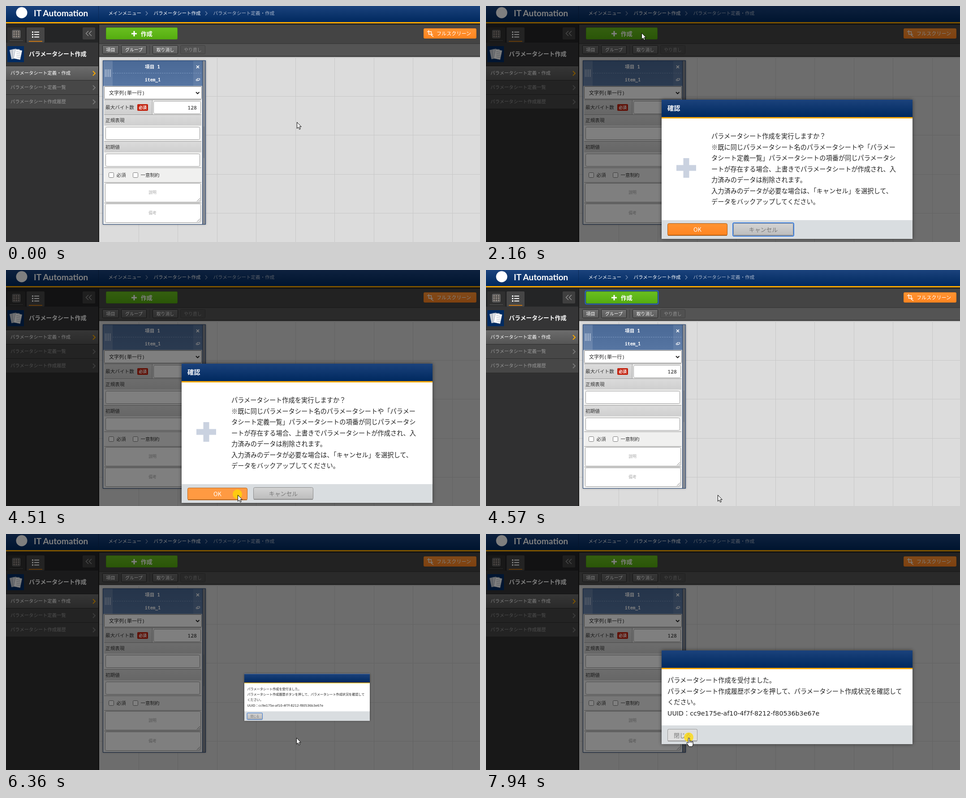
These frames come from a looping animation (1058 px wide and 529 px high, 8000 ms). An HTML page:

```html
<!DOCTYPE html>
<html lang="ja">
<head>
<meta charset="utf-8">
<style>
html, body { margin: 0; width: 100%; height: 100%; overflow: hidden; background: #dcdcdc; }
svg { display: block; width: 100vw; height: 100vh; }
text { font-family: "Noto Sans CJK JP", "Noto Sans CJK", sans-serif; white-space: pre; }
.b { font-weight: 700; }
.m { text-anchor: middle; }
.mono { font-family: "Noto Sans Mono", "Noto Sans CJK JP", monospace; }
.wide { font-family: "DejaVu Sans", "Noto Sans CJK JP", sans-serif; }
</style>
</head>
<body>
<svg id="stage" viewBox="0 0 1058 529" preserveAspectRatio="none"></svg>
<script>
const rect = (x, y, w, h, fill, more = '') =>
  `<rect x="${x}" y="${y}" width="${w}" height="${h}" fill="${fill}" ${more}/>`;
// 1px bordered box, snapped to pixel centres
const box = (x, y, w, h, fill, stroke, r = 2, more = '') =>
  rect(x + .5, y + .5, w - 1, h - 1, fill, `stroke="${stroke}" rx="${r}" ${more}`);
const line = (d, stroke, w = 1, more = '') =>
  `<path d="${d}" fill="none" stroke="${stroke}" stroke-width="${w}" ${more}/>`;
// y is the vertical middle of the glyphs
const text = (x, y, size, str, fill, cls = '') =>
  `<text x="${x}" y="${y + size * .38}" font-size="${size}" fill="${fill}" class="${cls}">${str}</text>`;
const grad = (id, a, b) =>
  `<linearGradient id="${id}" x2="0" y2="1"><stop stop-color="${a}"/><stop offset="1" stop-color="${b}"/></linearGradient>`;
const shadow = (id, size, opacity) =>
  `<filter id="${id}" x="-10%" y="-10%" width="120%" height="120%">` +
  `<feDropShadow dx="0" dy="0" stdDeviation="${size}" flood-opacity="${opacity}"/></filter>`;
const group = (id, body) => `<g id="${id}">${body}</g>`;
const ring = (id, x, y, w, h) =>
  group(id, rect(x - 1, y - 1, w + 2, h + 2, 'none', 'stroke="#1a6be0" stroke-width="1.6" rx="3"'));
const range = (n, f) => Array.from({ length: n }, (_, i) => f(i)).join('');

const defs = '<defs>' + grad('navy', '#1b427c', '#00295f') + grad('green', '#69bf20', '#55ad10') +
  grad('greenHi', '#7bc93c', '#65b924') + grad('orange', '#ff9433', '#ff8420') +
  grad('blue', '#4a6996', '#5675a2') + grad('label', '#dbdbdb', '#cfcfcf') +
  grad('grey', '#d4d4d4', '#bcbcbc') + grad('active', '#6c6c6c', '#555') +
  grad('tool', '#707070', '#5c5c5c') + grad('shade', '#888', '#dcdcdc') +
  shadow('soft', 4, .5) + shadow('faint', 2, .3) + '</defs>';

const header = rect(0, 0, 1058, 36, 'url(#navy)') + rect(206, 0, 1, 36, '#0a2a58') +
  rect(0, 36, 1058, 3, '#f9a800') + rect(0, 39, 1058, 3, '#262626') +
  '<circle cx="35" cy="15" r="12.5" fill="#fff"/>' +
  '<text x="62" y="22.5" font-size="19" fill="#fff" class="b" style="font-family:Lato,sans-serif">IT Automation</text>' +
  text(228.5, 16, 10.55, 'メインメニュー', '#fff') +
  text(329.5, 16, 10.55, 'パラメータシート作成', '#fff') +
  text(462.5, 16, 10.55, 'パラメータシート定義・作成', '#a9b6cb') +
  line('M312 12l4 4.5l-4 4.5M445 12l4 4.5l-4 4.5', '#6d85ab', 1.5);

const menuItem = (y, label, on) =>
  rect(0, y, 206, 31, on ? 'url(#active)' : '#474747') + rect(0, y + 31, 206, 1, '#2c2c2c') +
  text(10, y + 15.5, 10.35, label, on ? '#fff' : '#999') +
  line(`M194 ${y + 11}l5 5l-5 5`, on ? '#f9a800' : '#777', 2);

const sidebar = rect(0, 42, 206, 487, '#303031') + rect(0, 42, 206, 40, '#242526') +
  rect(3, 48, 40, 34, '#303030', 'rx="2"') + rect(46, 48, 40, 34, '#464646', 'rx="2"') +
  rect(8, 77, 30, 1, '#555') + rect(51, 78.5, 30, 1.5, '#f08300') +
  box(14, 54, 18, 18, 'none', '#999', 1) +
  range(9, i => rect(16 + i % 3 * 5, 56 + (i / 3 | 0) * 5, 4, 4, '#8d8680')) +
  range(3, i => rect(58, 57 + i * 5.5, 3, 3, '#fff') + rect(63, 57.5 + i * 5.5, 11, 2, '#fff')) +
  rect(171, 48, 28, 27, '#3f3f3f', 'rx="2"') +
  line('M184 56l-5.5 5.5l5.5 5.5M191 56l-5.5 5.5l5.5 5.5', '#999', 1.3) +
  rect(0, 82, 206, 52, '#353536') + rect(3, 90, 37, 36, '#002b62') +
  rect(10, 97, 15, 21, '#c9ced6', 'transform="rotate(-12 17 108)"') +
  rect(15, 97, 15, 21, '#e3e6ea', 'stroke="#8d98aa" stroke-width=".7"') +
  rect(19, 98, 15, 21, '#fff', 'transform="rotate(12 26 108)" stroke="#8d98aa" stroke-width=".7"') +
  range(4, i => line(`M23 ${102 + i * 4}l9 1.8`, '#aab2be', 1)) +
  text(51, 107, 12.9, 'パラメータシート作成', '#fff', 'b') + rect(0, 134, 206, 1, '#222') +
  menuItem(135, 'パラメータシート定義・作成', true) +
  menuItem(167, 'パラメータシート定義一覧') + menuItem(199, 'パラメータシート作成履歴') +
  rect(206, 42, 2, 487, '#1b1b1b');

const toolButton = (x, w, label, size, off) =>
  box(x, 88, w, 20, off ? '#515151' : 'url(#tool)', off ? '#404040' : '#242424') +
  text(x + w / 2, 98, size, label, off ? '#949494' : '#fff', 'm');

const toolbar = rect(208, 42, 850, 42, '#444') + rect(208, 84, 850, 1, '#333') +
  rect(208, 85, 850, 27, '#545454') + rect(208, 112, 850, 2, '#3a3a3a') +
  box(223, 48, 160, 27, 'url(#green)', '#4d9a12') +
  group('createHi', box(223, 48, 160, 27, 'url(#greenHi)', '#5fae25')) +
  ring('createRing', 222.5, 47.5, 161, 28) +
  line('M280 62h12M286 56v12', '#fff', 3) + text(301, 62, 12.9, '作成', '#fff', 'b') +
  box(932, 50, 118, 23, 'url(#orange)', '#f5801c') +
  line('M940 57.5h9.5v9.5M943.5 54v9.5h9.5M949 65l5 4', '#fff', 1.3) +
  text(961, 62, 11.1, 'フルスクリーン', '#fff') +
  toolButton(215, 37, '項目', 10.3) + toolButton(257, 57, 'グループ', 9.9) +
  rect(320, 88, 1, 20, '#404040') +
  toolButton(327, 57, '取り消し', 9.9) + toolButton(389, 56, 'やり直し', 9.9, true);

const grid = rect(208, 114, 850, 415, '#dcdcdc') + rect(208, 114, 850, 3, 'url(#shade)', 'opacity=".5"') +
  range(9, i => rect(Math.floor(296.2 + i * 87.5), 114, 1, 415, '#c8c8c8')) +
  range(4, i => rect(208, Math.floor(202 + i * 87.5), 850, 1, '#c8c8c8'));

const labelRow = (y, label) => rect(219, y, 217, 24, 'url(#label)') + text(222, y + 12, 10.65, label, '#333');
const field = (x, y, w, h) => box(x, y, w, h, '#fff', '#999', 3);
const check = (x, label) => box(x, 373, 12, 12, '#fff', '#777') + text(x + 17.5, 379, 10.5, label, '#333');
const area = (y, h, label) => field(221, y, 214, h) + text(327, y + 20.5, 8.9, label, '#c4c4c4', 'b m') +
  line(`M426 ${y + h - 2}l7 -7M430 ${y + h - 2}l3 -3`, '#777');

const card = rect(216, 122, 230, 368, '#1d3d6e', 'filter="url(#faint)"') +
  rect(217, 123, 221, 366, '#f0f0ef') + rect(439, 123, 6, 366, '#868a91') +
  rect(440.5, 270, 2.5, 71, '#757a82', 'rx="1"') +
  rect(217, 123, 221, 56, 'url(#blue)') + rect(217, 123, 21, 56, '#fff', 'opacity=".13"') +
  rect(418, 123, 20, 56, '#fff', 'opacity=".08"') +
  range(4, i => rect(221 + i * 3.7, 142, 1.3, 17, '#c6d2e4')) +
  line('M238 150.5h200', '#7d99c0', 1, 'stroke-dasharray="3 2"') +
  text(327, 136, 10.6, '項目 1', '#fff', 'b m mono') + text(327.5, 165, 9.75, 'item_1', '#fff', 'b m mono') +
  line('M425 133.5l6 6m0 -6l-6 6', '#fff', 1.7) +
  line('M427 162.5h5.5v3.5h-5.5zM426.5 164.5h-2v3h5v-1', '#fff') +
  rect(217, 179, 221, 2, '#c8ccd2') +
  box(219, 180, 218, 29, '#fff', '#767676', 1) + text(230, 194.5, 11.1, '文字列(単一行)', '#222', 'mono') +
  line('M424 193l3.7 3.7l3.7 -3.7', '#222', 2) +
  rect(219, 210, 217, 1, '#999') + rect(219, 211, 107, 32, 'url(#label)') + rect(326, 211, 1, 32, '#999') +
  text(222, 227, 10.65, '最大バイト数', '#333') + rect(293, 220, 24, 15, '#c3230f', 'rx="2"') +
  text(305, 227.5, 8.9, '必須', '#fff', 'b m') + field(329, 213, 106, 29) +
  '<text x="426" y="231.7" font-size="11.5" fill="#111" text-anchor="end" class="mono">128</text>' +
  rect(219, 243, 217, 1, '#999') + labelRow(244, '正規表現') + field(222, 271, 211, 29) +
  rect(219, 303, 217, 1, '#999') + labelRow(304, '初期値') + field(222, 331, 211, 29) +
  rect(219, 362, 217, 1, '#999') + check(229, '必須') + check(283, '一意制約') +
  rect(219, 395, 217, 1, '#999') + area(397, 43, '説明') +
  rect(219, 441, 217, 1, '#999') + area(443, 43, '備考');

const dialog = (id, y, h, body) => group(id,
  rect(392, y, 560, h, '#fff', 'filter="url(#soft)"') + rect(392, y, 560, 39, 'url(#navy)') +
  rect(392, y + 39, 560, 3, '#f9a800') + rect(392, y + h - 42, 560, 42, '#d9dde0') + body);
const lines = (x, y, rows) => rows.map((row, i) => text(x, y + i * 24.5, 14.23, row, '#222')).join('');
const button = (x, y, w, label, fill, edge, ink) =>
  box(x, y, w, 28, fill, edge, 3) + rect(x + 1, y + 26, w - 2, 2, edge, 'rx="1"') +
  text(x + w / 2, y + 14, 12.9, label, ink, 'm');

const confirmBox = dialog('confirm', 210, 312,
  text(405, 229, 14.2, '確認', '#fff', 'b') +
  line('M425 363h44M447 341v44', '#cad2e0', 13) +
  lines(503, 292, [
    'パラメータシート作成を実行しますか？',
    '※既に同じパラメータシート名のパラメータシートや「パラメー',
    'タシート定義一覧」パラメータシートの項番が同じパラメータシ',
    'ートが存在する場合、上書きでパラメータシートが作成され、入',
    '力済みのデータは削除されます。',
    '入力済みのデータが必要な場合は、「キャンセル」を選択して、',
    'データをバックアップしてください。']) +
  group('ok', button(405, 487, 134, 'OK', 'url(#orange)', '#a85a14', '#fff')) +
  group('okHi', button(405, 488, 134, 'OK', '#ff9a42', '#b8671f', '#fff')) +
  button(552, 487, 134, 'キャンセル', 'url(#grey)', '#8b8b8b', '#777') +
  ring('cancelRing', 552, 487, 134, 28));

const noticeBox = dialog('notice', 261, 210,
  lines(405, 328, [
    'パラメータシート作成を受付ました。',
    'パラメータシート作成履歴ボタンを押して、パラメータシート作成状況を確認して',
    'ください。']) +
  text(405, 402, 14.23, 'UUID：cc9e175e-af10-4f7f-8212-f80536b3e67e', '#222', 'wide') +
  button(405, 437, 67, '閉じる', 'url(#grey)', '#8b8b8b', '#777') +
  group('closeHi', button(405, 437, 67, '閉じる', '#dedede', '#999', '#777')) +
  ring('closeRing', 405, 437, 67, 28));

const pointer = group('cursor', '<circle id="click" r="10.5" cx="-.5" cy="-1.5" fill="#ffd900" opacity=".75"/>' +
  '<path id="arrow" d="M.5 .5v14l3.2 -3l2.2 5l2.3 -1l-2.2 -4.8h4.2z" fill="#fff" stroke="#000"/>' +
  '<path id="hand" d="M-1.5 1.2q1.5 -1.6 3 0v6q1.5 -1.2 2.7 .3q1.6 -.8 2.6 .6q2 -.5 2.4 1.4v4.5q-.2 2.5 -1.7 5.5h-7.5q-1.2 -3.2 -5.5 -8q.8 -2.4 4 .2z' +
  'M1.5 7v4M4.2 8v3M6.8 8.5v3" fill="#fff" stroke="#000"/>');

stage.innerHTML = defs + grid + card + toolbar + sidebar + header +
  rect(0, 0, 1058, 529, '#000', 'id="dim" opacity=".5"') + confirmBox + noticeBox + pointer;

const el = id => document.getElementById(id);
const show = (id, on) => el(id).setAttribute('display', on ? 'inline' : 'none');
const smooth = u => u * u * (3 - 2 * u);
const linear = u => u;

// start, last change, steps, target x, target y, easing
const moves = [
  [620, 1370, 13, 363, 74, smooth],
  [1460, 1700, 5, 347, 60, smooth],
  [2440, 3220, 13, 467, 193, u => u ** 1.5],
  [3280, 4060, 13, 537, 477, linear],
  [4120, 4370, 5, 517, 504, smooth],
  [5160, 5680, 9, 649, 457, smooth],
  [5960, 5961, 1, 648, 456.5, linear],
  [7170, 7570, 7, 453, 457, smooth]
];

function cursorAt(t) {
  let x = 649, y = 260;
  for (const [a, b, n, tx, ty, ease] of moves) {
    if (t < a) break;
    const step = n > 1 ? Math.floor((t - a) * (n - 1) / (b - a) + .001) : 0;
    const k = ease(Math.min(1, (step + 1) / n));
    x += (tx - x) * k;
    y += (ty - y) * k;
  }
  return [x, y];
}

function draw(t) {
  const during = (a, b) => t >= a && t < b;
  const [x, y] = cursorAt(t);
  const asking = during(2100, 4570), told = t >= 6360;
  const closing = t >= 7170 && x < 472;
  const scale = during(2100, 2160) || during(6360, 6430) ? .5 : during(6430, 6490) ? .9 : 1;
  const zoom = `translate(672 366) scale(${scale}) translate(-672 -366)`;

  show('createHi', during(1460, 2100));
  show('createRing', during(4570, 6360));
  show('dim', asking || told);
  for (const [id, on] of [['confirm', asking], ['notice', told]]) {
    show(id, on);
    el(id).setAttribute('transform', zoom);
  }
  const onOk = during(4190, 4570);
  show('ok', !onOk);
  show('okHi', onOk);
  show('cancelRing', t < 4430);
  show('closeHi', closing);
  show('closeRing', !closing);

  const hand = during(1460, 2040) || during(4190, 4510) || closing;
  show('hand', hand);
  show('arrow', !hand);
  show('click', during(1860, 2040) || during(4430, 4570) || t >= 7940);
  el('cursor').setAttribute('transform', `translate(${x} ${y})`);
}

const start = performance.now();
function tick() {
  draw((performance.now() - start) % 8000);
  requestAnimationFrame(tick);
}
tick();
</script>
</body>
</html>
```
